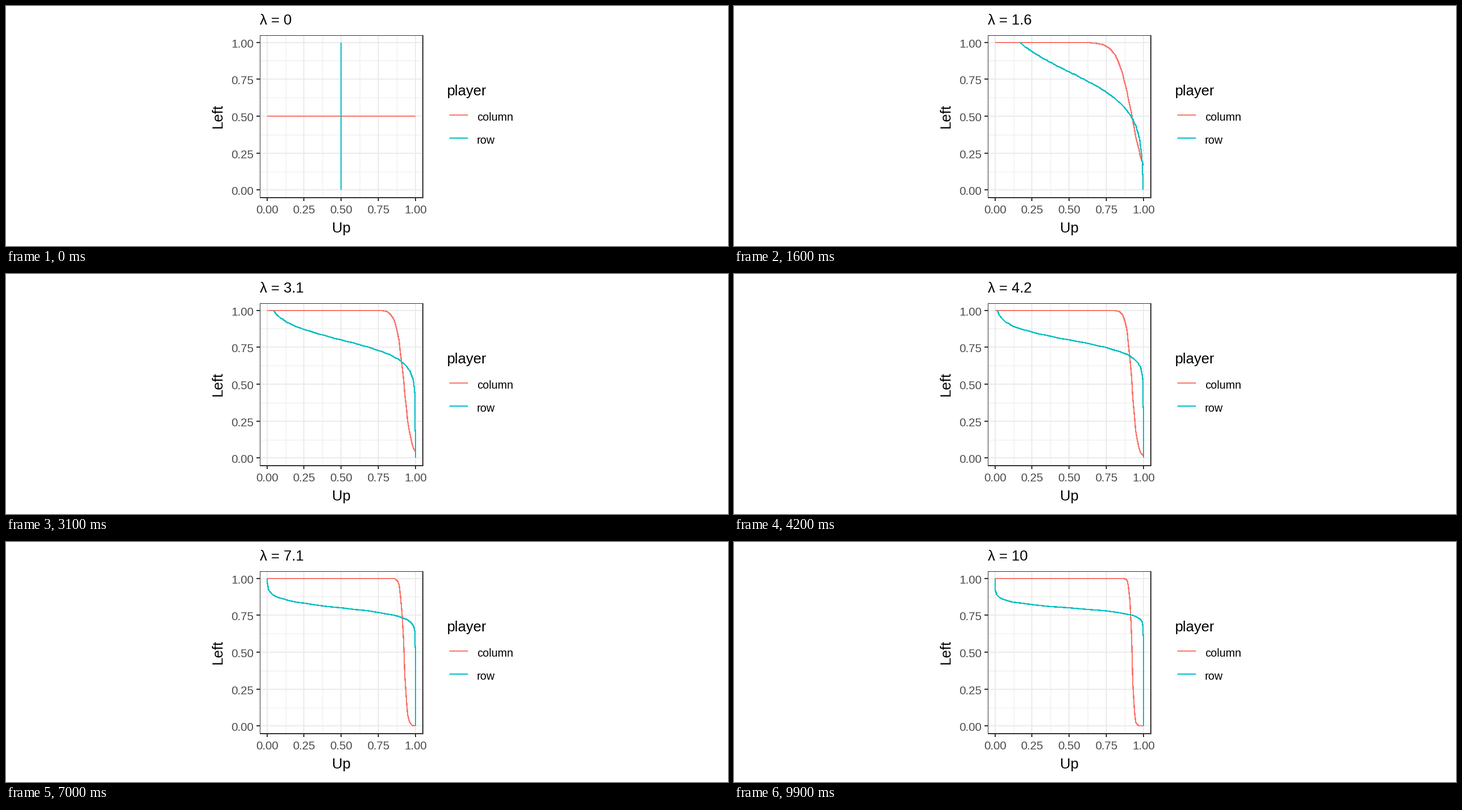
These frames come from a looping animation (1280x427 px, 10000 ms). A matplotlib script:

```python
import numpy as np
import matplotlib.pyplot as plt
from matplotlib.animation import FuncAnimation

W, H, DPI = 1280, 427, 64
PT = 72 / DPI  # points per pixel
FRAMES = 100
RED, TEAL = "#F8766D", "#00BFC4"
GRID, DARK, GREY = "#EBEBEB", "#333333", "#4D4D4D"
LEFT, RIGHT, TOP, BOTTOM = 450, 740, 52, 342
CURVE = 1.3  # fills two pixels when upright or level, less on slopes

plt.rcParams["font.family"] = "Liberation Sans"
fig = plt.figure(figsize=(W / DPI, H / DPI), dpi=DPI, facecolor="white")
ax = fig.add_axes([0, 0, 1, 1])
ax.set_xlim(0, W)
ax.set_ylim(H, 0)
ax.axis("off")


# data to whole pixels
def px(u):
    return np.floor(463.32 + 262.7 * np.asarray(u))


def py(v):
    return np.floor(327.85 - 262.7 * np.asarray(v))


def line(xs, ys, color, width=2, z=1):
    return ax.plot(xs, ys, color=color, lw=width * PT, zorder=z, snap=False,
                   antialiased=False, solid_capstyle="butt",
                   solid_joinstyle="round")[0]


def label(x, y, s, size, color="black", ha="left", **kw):
    return ax.text(x, y, s, fontsize=size * PT, color=color, ha=ha,
                   va="baseline", **kw)


def logistic(z):
    return 1 / (1 + np.exp(-z))


# panel grid
for t in np.arange(0.125, 1, 0.25):
    x, y = px(t) + 0.5, py(t) + 0.5
    line([x, x], [TOP, BOTTOM], GRID, 1)
    line([LEFT, RIGHT], [y, y], GRID, 1)
for t in np.linspace(0, 1, 5):
    x, y = px(t), py(t)
    line([x, x], [TOP, BOTTOM], GRID, z=2)
    line([LEFT, RIGHT], [y, y], GRID, z=2)
    line([x, x], [BOTTOM, 347], DARK)
    line([444, LEFT], [y, y], DARK)
    label(x, 369, f"{t:.2f}", 20.6, GREY, "center")
    label(439, y + 9, f"{t:.2f}", 20.6, GREY, "right")

# border, thinner on the left and top
line([LEFT + 0.5] * 2, [TOP, BOTTOM], DARK, 1, 5)
line([LEFT, RIGHT], [TOP + 0.5] * 2, DARK, 1, 5)
line([RIGHT - 1] * 2, [TOP, BOTTOM], DARK, 2, 5)
line([LEFT, RIGHT], [BOTTOM - 1] * 2, DARK, 2, 5)

# axis titles and legend
label(594.5, 403, "Up", 25.7, ha="center")
label(383, 195, "Left", 25.7, ha="center", rotation=90,
      rotation_mode="anchor")
label(781, 159, "player", 25.7)
for y, name, color in [(194, "column", RED), (235, "row", TEAL)]:
    line([786, 819], [y, y], color)
    label(835, y + 10, name, 19.9)

title = label(450, 33, "", 25.7)
column = line([], [], RED, CURVE, z=3)
row = line([], [], TEAL, CURVE, z=4)
prob = np.linspace(0, 1, 101)


def draw(i):
    lam = round(i * 100 / (FRAMES - 1)) / 10
    title.set_text(f"λ = {lam:g}")
    column.set_data(px(prob), py(logistic(lam * (12 - 13 * prob))))
    row.set_data(px(logistic(lam * (4 - 5 * prob))), py(prob))
    return title, column, row


anim = FuncAnimation(fig, draw, frames=FRAMES, interval=100, repeat=True,
                     repeat_delay=0, blit=False)
plt.show()
```
